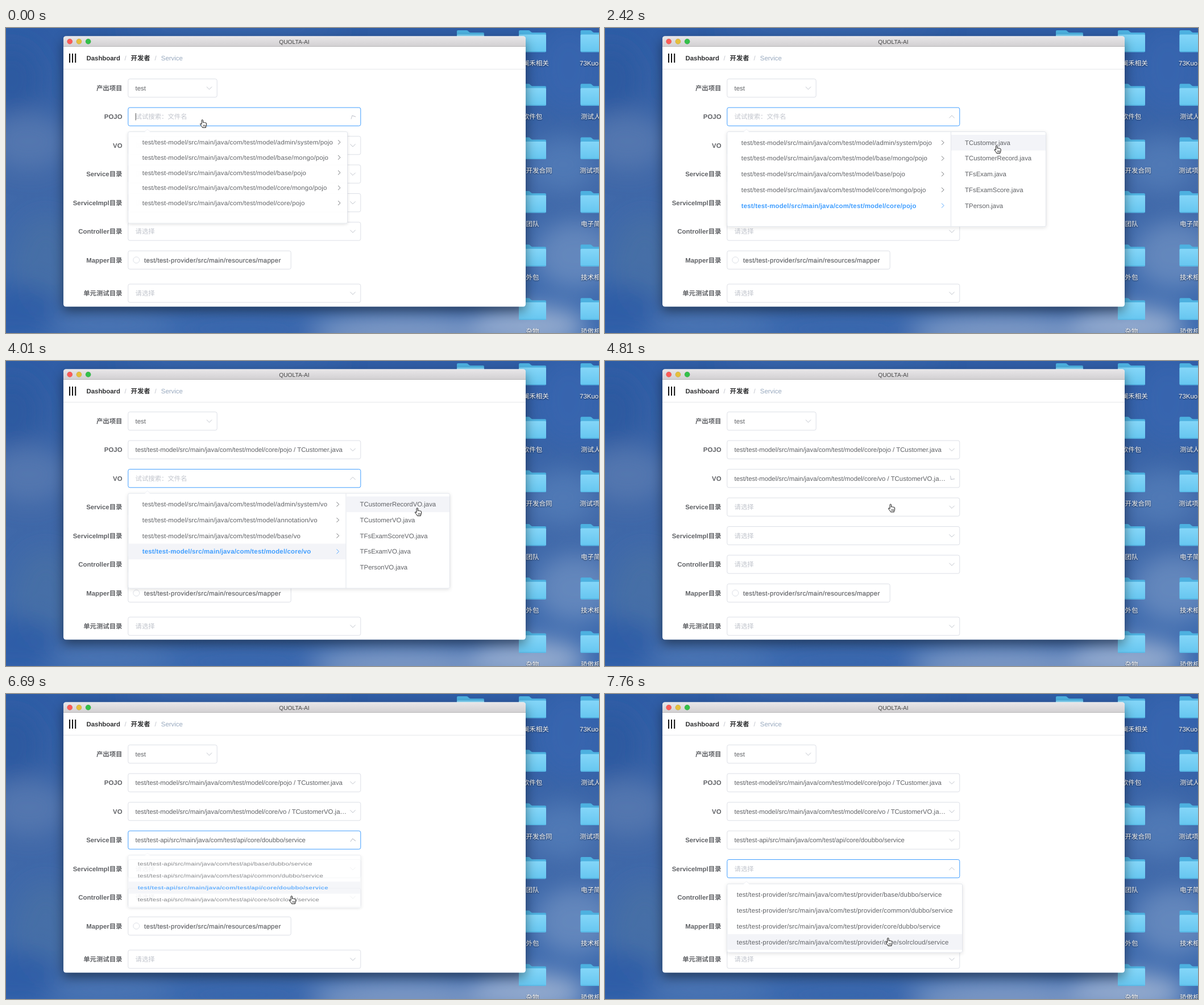
An HTML page for the animation above (8000 ms loop, 1043 px wide and 537 px high).

```html
<!DOCTYPE html>
<html lang="zh-CN">
<head>
<meta charset="utf-8">
<style>
html, body { margin: 0; height: 100%; overflow: hidden; background: #3a66ab; }
svg { display: block; width: 1043px; height: 537px; }
text { font: 11.4px "Liberation Sans", "Noto Sans CJK SC", sans-serif; fill: #606266; text-rendering: geometricPrecision; white-space: pre; }
.b { font-weight: 700; }
.path { letter-spacing: .19px; }
.hint { fill: #c0c4cc; }
.on { fill: #409eff; font-weight: 700; }
.folder { font-size: 11.5px; font-weight: 500; fill: #fff; filter: drop-shadow(0 1px 1px rgba(0,0,0,.7)); }
.line { fill: none; stroke: #c0c4cc; stroke-width: 1; }
</style>
</head>
<body>
<svg viewBox="0 0 1043 537" xmlns="http://www.w3.org/2000/svg">
  <defs>
    <linearGradient id="sky" x1="0" y1="0" x2="0" y2="1">
      <stop offset="0" stop-color="#2f5da6"/><stop offset=".5" stop-color="#4068a8"/><stop offset="1" stop-color="#3c6bb0"/>
    </linearGradient>
    <linearGradient id="bar" x1="0" y1="0" x2="0" y2="1">
      <stop offset="0" stop-color="#e9e7e9"/><stop offset="1" stop-color="#d1cfd1"/>
    </linearGradient>
    <linearGradient id="front" x1="0" y1="0" x2="0" y2="1">
      <stop offset="0" stop-color="#84d6f8"/><stop offset="1" stop-color="#66c6f0"/>
    </linearGradient>
    <filter id="soft" x="-50%" y="-50%" width="200%" height="200%"><feGaussianBlur stdDeviation="20"/></filter>
    <filter id="drop" x="-10%" y="-10%" width="120%" height="125%"><feDropShadow dx="0" dy="8" stdDeviation="10" flood-opacity=".45"/></filter>
    <filter id="lift" x="-10%" y="-10%" width="120%" height="125%"><feDropShadow dx="0" dy="1.6" stdDeviation="3" flood-opacity=".12"/></filter>
  </defs>
  <rect width="1043" height="537" fill="url(#sky)"/>
  <g id="clouds" filter="url(#soft)"></g>
  <g id="desktop"></g>
  <g id="window"></g>
  <g id="form"></g>
  <g id="popup"></g>
  <g id="cursor"></g>
</svg>
<script>
const $ = id => document.getElementById(id);
const LOOP = 8000, STEPS = 30, ROW = 27.7, FIELD_X = 214.8;

const text = (x, y, s, cls = '', extra = '') => `<text x="${x}" y="${y + 4}" class="${cls}" ${extra}>${s}</text>`;
const rect = (x, y, w, h, fill, extra = '') => `<rect x="${x}" y="${y}" width="${w}" height="${h}" fill="${fill}" ${extra}/>`;
const box = (x, y, w, h, stroke) => rect(x, y, w, h, '#fff', `rx="3" stroke="${stroke}"`);
const chevron = (x, y, turn = 0) =>
  `<path class="line" transform="translate(${x} ${y}) rotate(${turn})" d="M-4.6 -2.3L0 2.3 4.6 -2.3"/>`;
// Last entry of a track whose step has been reached.
const at = (track, i) => track.filter(k => k[0] <= i).pop() || [];

const model = p => 'test/test-model/src/main/java/com/test/model/' + p;
const api = p => 'test/test-api/src/main/java/com/test/api/' + p;
const provider = p => 'test/test-provider/src/main/java/com/test/provider/' + p;
const java = names => names.map(n => n + '.java');

const search = '试试搜索：文件名', choose = '请选择';
const fields = [
  { label: 'POJO', y: 156.2, hint: search, value: model('core/pojo / TCustomer.java'), from: 10 },
  { label: 'VO', y: 206.7, hint: search, value: model('core/vo / TCustomerVO.ja…'), from: 18 },
  { label: 'Service目录', y: 257.1, hint: choose, value: api('core/doubbo/service'), from: 25 },
  { label: 'ServiceImpl目录', y: 307.6, hint: choose },
  { label: 'Controller目录', y: 358, hint: choose },
  { label: '单元测试目录', y: 467, hint: choose }
];

const lists = [
  { y: 182.6, h: 167, right: 600.5, rows: ['admin/system/pojo', 'base/mongo/pojo', 'base/pojo', 'core/mongo/pojo', 'core/pojo'].map(model),
    subRight: 775.5, sub: java(['TCustomer', 'TCustomerRecord', 'TFsExam', 'TFsExamScore', 'TPerson']) },
  { y: 233.1, h: 167, right: 590, rows: ['admin/system/vo', 'annotation/vo', 'base/vo', 'core/vo'].map(model),
    subRight: 780.5, sub: java(['TCustomerRecordVO', 'TCustomerVO', 'TFsExamScoreVO', 'TFsExamVO', 'TPersonVO']) },
  { y: 283.8, h: 120.8, right: 624, rows: ['base/dubbo', 'common/dubbo', 'core/doubbo', 'core/solrcloud'].map(p => api(p + '/service')) },
  { y: 334.3, h: 120.8, right: 628.5, rows: ['base/dubbo', 'common/dubbo', 'core/dubbo', 'core/solrcloud'].map(p => provider(p + '/service')) }
];

// Each track entry starts with the step at which it takes over.
const focusTrack = [[0, 0], [10, -1], [11, 1], [18, -1], [19, 2], [26, -1], [27, 3]];
const openTrack = [[0, 0, .966, .98], [1, 0, 1, 1], [10, -1], [11, 1, .95, .96], [12, 1, 1, 1], [18, -1],
  [19, 2, .94, .95], [20, 2, 1, 1], [25, 2, .766, .78], [26, -1], [27, 3, .96, .97], [28, 3, 1, 1]];
const hoverTrack = [[0, -1], [1, 4], [9, -1], [12, 3], [18, -1], [20, 3], [25, 2], [26, -1], [28, 3]];
const activeTrack = [[0, -1], [5, 4], [10, -1], [14, 3], [18, -1], [25, 2], [26, -1]];
const subTrack = [[0, -1], [9, 0], [10, -1], [15, 0], [17, 1], [18, -1]];
const caretTrack = [[0, 1], [1, 0], [3, 1], [5, 0], [11, 1], [13, 0], [19, 1], [21, 0], [22, 1], [24, 0], [27, 1], [29, 0]];
const cursorTrack = [[0, 347.5, 168.5], [2], [3, 392.5, 330, 'arrow'], [4, 401, 326], [6, 560, 280], [7, 700, 229.5],
  [8, 696, 217.5], [9, 691, 213.8], [10, 522, 208], [13, 515, 347], [15, 725.5, 265.8], [16, 709.5, 295.5],
  [18, 504.5, 259], [21, 504.5, 383.8], [22, 504.5, 386], [24, 504.5, 362.5], [26, 504.5, 309], [29, 500, 436.5]];

function drawDesktop() {
  const clouds = [[40, 200, 70, 50, '#6583b4', .6], [70, 420, 60, 90, '#55789f', .35], [10, 90, 50, 60, '#2c589f', .7],
    [10, 500, 90, 50, '#2c5ca6', .8], [180, 520, 110, 22, '#5d82b8', .5], [420, 530, 130, 20, '#3865ac', .8],
    [700, 535, 160, 32, '#93a9cb', .75], [920, 525, 100, 35, '#bac7dc', .7], [1000, 400, 70, 60, '#7d9bc8', .6],
    [980, 240, 60, 50, '#5880bb', .7], [990, 70, 60, 80, '#3767b1', .8], [400, 0, 200, 14, '#4773b4', .6]];
  $('clouds').innerHTML = clouds.map(([x, y, rx, ry, c, o]) =>
    `<ellipse cx="${x}" cy="${y}" rx="${rx}" ry="${ry}" fill="${c}" opacity="${o}"/>`).join('');

  const folder = (x, y) => `<g transform="translate(${x} ${y})">
    <path d="M0 36V2Q0 0 2 0H17Q19 0 20.500 2T24 4H46Q48 4 48 6V36Z" fill="#4db1e0"/>
    ${rect(0, 7.5, 48, 31, 'url(#front)', 'rx="1.8"')}${rect(.5, 37, 47, 1, '#4fb2e0')}</g>`;
  const near = ['新澜禾相关', '软件包', '项目开发合同', '团队', '外包', '杂物'];
  const far = ['73KuoB', '测试人员', '测试项目', '电子简历', '技术相关', '骄傲相关'];
  $('desktop').innerHTML = folder(793, 4) + near.map((name, i) => {
    const y = 4 + i * 94.3;
    return folder(902, y) + folder(1010.5, y) +
      text(926, y + 58, name, 'folder', 'text-anchor="middle"') +
      text(i % 2 || i > 3 ? 1011 : 1009, y + 58, far[i], 'folder');
  }).join('');
}

function drawWindow() {
  const lights = ['#fc5b57', '#e5bf3c', '#34c04a'];
  $('window').innerHTML =
    rect(101, 14.5, 813, 476, '#fff', 'rx="4.5" filter="url(#drop)"') +
    '<path d="M101 33V19Q101 14.500 105.500 14.500H909.500Q914 14.500 914 19V33Z" fill="url(#bar)"/>' +
    rect(101, 32, 813, 1, '#b9b7b9') +
    lights.map((c, i) => `<circle cx="${112.2 + i * 16.2}" cy="23.8" r="4.7" fill="${c}" stroke="#000" stroke-opacity=".15" stroke-width=".6"/>`).join('') +
    text(507, 23.8, 'QUOLTA-AI', '', 'text-anchor="middle" style="font-size:10.2px;fill:#454545"') +
    [111, 116, 121.2].map(x => rect(x, 45, 2, 16, '#111')).join('') +
    text(141.5, 53, 'Dashboard', 'b', 'style="fill:#303133"') + text(208.5, 53, '/', 'hint') +
    text(219.5, 53, '开发者', 'b', 'style="fill:#303133"') + text(261.5, 53, '/', 'hint') +
    text(272.8, 53, 'Service', '', 'style="fill:#97a8be"') +
    rect(101, 72, 813, 1, '#e6e7ea');
}

const label = (y, s) => text(204.5, y, s, 'b', 'text-anchor="end"');

function drawForm(i) {
  const focus = at(focusTrack, i)[1], scale = at(openTrack, i)[2];
  const closing = { 10: 0, 18: 1, 26: 2 }[i];
  let out = label(105.8, '产出项目') + box(FIELD_X, 89.7, 156.4, 32.2, '#dcdfe6') +
    text(227.5, 105.8, 'test') + chevron(357.5, 105.8);
  fields.forEach((f, n) => {
    const filled = i >= f.from, focused = n === focus;
    const turn = focused ? (scale < .9 ? 172 : scale < 1 ? 153 : 180) : n === closing ? 35 : 0;
    out += label(f.y, f.label) + box(FIELD_X, f.y - 16.1, 409, 32.2, focused ? '#409eff' : '#dcdfe6') +
      text(227.5, f.y, filled ? f.value : f.hint, filled ? '' : 'hint') + chevron(610, f.y, turn);
    if (focused && at(caretTrack, i)[1]) out += rect(227.6, f.y - 6.2, 1, 12.5, '#555');
  });
  out += label(408.5, 'Mapper目录') + box(FIELD_X, 392.4, 286.4, 32.2, '#dcdfe6') +
    '<circle cx="229.300" cy="408.500" r="5.500" fill="#fff" stroke="#dcdfe6"/>' +
    text(243, 408.5, 'test/test-provider/src/main/resources/mapper', '',
      'style="letter-spacing:.33px;stroke:#606266;stroke-width:.2px"');
  $('form').innerHTML = out;
}

function drawPopup(i) {
  const [, n = -1, scale, opacity] = at(openTrack, i), list = lists[n];
  if (!list) return void ($('popup').innerHTML = '');
  const hover = at(hoverTrack, i)[1], active = at(activeTrack, i)[1], subHover = at(subTrack, i)[1];
  const expanded = list.sub && active >= 0, x = FIELD_X;
  const right = list.right + (expanded ? 8 : 0), edge = expanded ? list.subRight : right;
  const mid = k => 19.2 + k * ROW;
  const shade = (from, to, k) => k < 0 ? '' : rect(from + .5, mid(k) - ROW / 2, to - from - 1, ROW, '#f3f4f8');
  let out = `<g filter="url(#lift)">${rect(x, 0, edge - x, list.h, '#fff', 'rx="2.5" stroke="#e2e5eb"')}</g>` +
    '<path d="M243.500 .7L248.700 -4.700 253.900 .7" fill="#fff" stroke="#ebeef5" stroke-width=".8"/>' +
    shade(x, right, hover);
  list.rows.forEach((s, k) => {
    const on = k === active;
    out += text(list.sub ? 239.8 : 231.8, mid(k), s, 'path' + (on ? ' on' : ''));
    if (list.sub) out += `<path d="M${right - 16.5} ${mid(k) - 4}l4 4 -4 4" fill="none" stroke="${on ? '#409eff' : '#606266'}" stroke-width=".9"/>`;
  });
  if (expanded) {
    out += rect(right - .5, 0, 1, list.h, '#e2e5eb') + shade(right, edge, subHover) +
      list.sub.map((s, k) => text(right + 24.6, mid(k), s)).join('');
  }
  $('popup').innerHTML = `<g transform="translate(0 ${list.y}) scale(1 ${scale})" opacity="${opacity}">${out}</g>`;
}

function drawCursor(i) {
  const [, x, y, kind] = at(cursorTrack, i);
  const arrow = '<path d="M0 0V12.200L2.800 9.600 4.700 13.900 6.800 13 4.900 8.800H8.700Z" fill="#000" stroke="#fff" stroke-width=".9"/>';
  const hand = '<path d="M-3.400 1V-5.700a1.200 1.200 0 0 1 2.400 0V-2q1.100-.9 2.100 .1 1.200-.7 2.100 .4 1.700-.4 1.900 1.200V2.400q0 1.700-1.100 3.100V6.800H-2.100q-.4-1.500-2.200-3.400L-5.800 1.300q-.6-1.700 1-1.200Z" fill="#fff" stroke="#111" stroke-linejoin="round"/>' +
    '<path d="M-.4 2V5M1.300 2V5M3 2V5" stroke="#111" stroke-width=".7"/>';
  $('cursor').innerHTML = x === undefined ? '' : `<g transform="translate(${x} ${y})">${kind ? arrow : hand}</g>`;
}

let shown = -1;
function render(now) {
  const i = Math.floor((now % LOOP) / LOOP * STEPS);
  if (i !== shown) {
    shown = i;
    drawForm(i);
    drawPopup(i);
    drawCursor(i);
  }
}

drawDesktop();
drawWindow();
const start = performance.now();
function tick() {
  render(performance.now() - start);
  requestAnimationFrame(tick);
}
tick();
</script>
</body>
</html>
```
